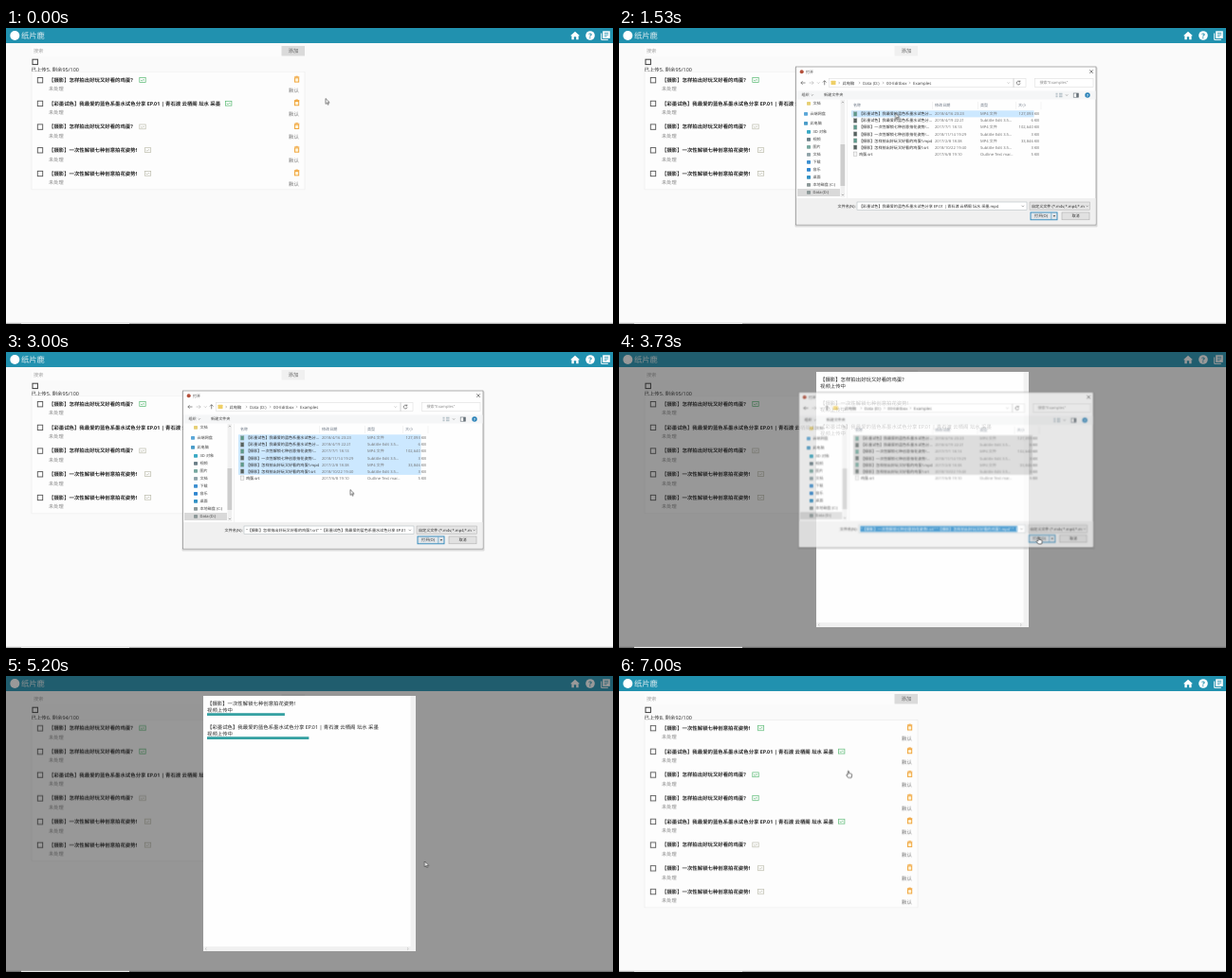
These frames come from a looping animation (640 px wide and 313 px high, 7.07 s). An HTML page:

```html
<!DOCTYPE html>
<html>
<head>
<meta charset="utf-8">
<title>Upload demo</title>
<style>
html, body { margin: 0; width: 100%; height: 100%; overflow: hidden; background: #fafafa; }
svg { display: block; width: 100vw; height: 100vh; }
text { font-family: "Noto Sans", "Noto Sans CJK SC", sans-serif; white-space: pre; text-rendering: geometricPrecision; }

.anim { animation: 7070ms linear infinite; }
.step { animation-timing-function: step-end; }

.rows { animation-name: rows; }
@keyframes rows {
  0% { transform: translateY(-74.1px); }
  69% { transform: translateY(-49.4px); }
  84.2% { transform: translateY(-24.7px); }
  90.5%, 100% { transform: translateY(0); }
}
.n5 { animation-name: n5; }
.n6 { animation-name: n6; }
.n7 { animation-name: n7; }
.n8 { animation-name: n8; }
@keyframes n5 { 0% { opacity: 1; } 69%, 100% { opacity: 0; } }
@keyframes n6 { 0% { opacity: 0; } 69% { opacity: 1; } 84.2%, 100% { opacity: 0; } }
@keyframes n7 { 0% { opacity: 0; } 84.2% { opacity: 1; } 90.5%, 100% { opacity: 0; } }
@keyframes n8 { 0% { opacity: 0; } 90.5%, 100% { opacity: 1; } }

.add { animation-name: add; }
@keyframes add { 0% { fill: #dadada; } 12.3% { fill: #f0f0f0; } 90.5%, 100% { fill: #dadada; } }

.modal { animation-name: modal; }
@keyframes modal { 0% { opacity: 0; } 52.3% { opacity: 1; } 90.5%, 100% { opacity: 0; } }
.queue { animation-name: queue; }
@keyframes queue { 0% { transform: none; } 69%, 100% { transform: translateY(-25px); } }
.up1 { animation-name: n5; }
.up3 { animation-name: up3; }
@keyframes up3 { 0% { opacity: 1; } 84.2%, 100% { opacity: 0; } }

.bar { transform-box: fill-box; transform-origin: left; }
.bar1 { animation-name: bar1; }
.bar2 { animation-name: bar2; }
.bar3 { animation-name: bar3; }
@keyframes bar1 { 0%, 54% { transform: scaleX(0); } 67.9%, 100% { transform: scaleX(1); } }
@keyframes bar2 { 0%, 63.2% { transform: scaleX(0); } 89.1%, 100% { transform: scaleX(1); } }
@keyframes bar3 { 0%, 64.2% { transform: scaleX(0); } 82%, 100% { transform: scaleX(1); } }

.dialog { animation-name: dialog; transform-origin: 344.5px 125px; }
@keyframes dialog {
  0%, 12.3% { opacity: 0; transform: scale(.95); }
  14%, 52.3% { opacity: 1; transform: none; }
  54.5%, 100% { opacity: 0; transform: scale(.91); }
}
.band { animation-name: band; transform-box: fill-box; transform-origin: top; }
@keyframes band {
  0% { transform: scaleY(0); fill: #cce8ff; }
  19.8% { transform: scaleY(.1667); }
  25% { transform: scaleY(.3333); }
  28% { transform: scaleY(.5); }
  31.5% { transform: scaleY(.6667); }
  35% { transform: scaleY(.8333); }
  38.5% { transform: scaleY(1); fill: #cce8ff; }
  52.2%, 100% { transform: scaleY(1); fill: #d4d4d4; }
}
.one { animation-name: one; }
.many { animation-name: many; }
.marked { animation-name: marked; }
@keyframes one { 0% { opacity: 0; } 19.8% { opacity: 1; } 25%, 100% { opacity: 0; } }
@keyframes many { 0% { opacity: 0; } 25% { opacity: 1; } 52.2%, 100% { opacity: 0; } }
@keyframes marked { 0% { opacity: 0; } 52.2%, 100% { opacity: 1; } }

.cursor { animation-name: cursor; animation-timing-function: ease-in-out; }
@keyframes cursor {
  0%, 1% { transform: translate(337px, 74.5px); }
  9%, 13% { transform: translate(303px, 22px); }
  19%, 22.5% { transform: translate(291.5px, 90px); }
  25% { transform: translate(292px, 97px); }
  28% { transform: translate(293px, 104px); }
  31.5% { transform: translate(294px, 111px); }
  35% { transform: translate(295px, 118px); }
  38.5% { transform: translate(297px, 125px); }
  41.7%, 43% { transform: translate(363px, 145.5px); }
  50.5%, 90% { transform: translate(441.5px, 196px); animation-timing-function: linear; }
  93.9% { transform: translate(339px, 150px); animation-timing-function: ease-out; }
  98.5%, 100% { transform: translate(241px, 100.5px); }
}
.arrow { animation-name: arrow; }
.hand { animation-name: hand; }
@keyframes arrow {
  0% { opacity: 1; } 8% { opacity: 0; } 13% { opacity: 1; }
  52.3% { opacity: 0; } 55% { opacity: 1; } 96%, 100% { opacity: 0; }
}
@keyframes hand {
  0% { opacity: 0; } 8% { opacity: 1; } 13% { opacity: 0; }
  52.3% { opacity: 1; } 55% { opacity: 0; } 96%, 100% { opacity: 1; }
}
</style>
</head>
<body>
<svg id="stage" viewBox="0 0 640 313"></svg>
<script>
const EGG = '【摄影】怎样拍出好玩又好看的鸡蛋?';
const FLOWER = '【摄影】一次性解锁七种创意拍花姿势!';
const INK = '【彩墨试色】我最爱的蓝色系墨水试色分享 EP.01 | 青石渡 云栖阁 坛水 采墨';
const ROW = 24.7, UPLOAD = 25;

// y is the vertical middle of the line
const text = (x, y, s, size = 4.1, fill = '#444', extra = '') =>
  `<text x="${x}" y="${(y + size * .36).toFixed(2)}" font-size="${size}" fill="${fill}" ${extra}>${s}</text>`;
const rect = (x, y, w, h, fill, extra = '') =>
  `<rect x="${x}" y="${y}" width="${w}" height="${h}" fill="${fill}" ${extra}/>`;
const path = (d, stroke, width = .6, fill = 'none') =>
  `<path d="${d}" stroke="${stroke}" stroke-width="${width}" fill="${fill}"/>`;
const group = (cls, body, extra = '') => `<g class="${cls}" ${extra}>${body}</g>`;
const clip = (id, x, y, w, h) => `<clipPath id="${id}">${rect(x, y, w, h, '#000')}</clipPath>`;
const box = (x, y) => rect(x, y, 5.4, 5.4, 'none', 'stroke="#555" stroke-width=".9"');

function header() {
  return rect(0, 0, 640, 16, '#2191af')
    + '<circle cx="9.3" cy="8" r="5" fill="#fff"/>'
    + text(16, 8, '纸片鹿', 8.3, '#e4eff2')
    + path('M595 8.3L600 3.7 605 8.3H603.6V12.3H601.2V9.3H598.8V12.3H596.4V8.3Z', 'none', 0, '#fff')
    + '<circle cx="616" cy="8" r="4.8" fill="#fff"/>'
    + text(616, 8.1, '?', 7.5, '#2191af', 'text-anchor="middle" font-weight="700"')
    + path('M627.7 5.5V12.4H634.8', '#fff', 1)
    + rect(629.2, 3.3, 7.6, 7.6, '#fff')
    + path('M630.8 5.3H635.2M630.8 7.1H635.2M630.8 8.9H633.5', '#2191af', .8);
}

function toolbar() {
  const count = n => group(`anim step n${n}`, text(26.5, 44, `已上传${n}, 剩余${100 - n}/100`, 5.4, '#333'));
  return rect(27, 18.5, 288, 11.5, '#fcfcfc')
    + text(29, 24.5, '搜索', 5.2, '#a4a4a4')
    + rect(290.5, 19, 24.5, 10.5, '#dadada', 'class="anim step add"')
    + text(303, 24.4, '添加', 5.4, '#666', 'text-anchor="middle"')
    + rect(28, 33.2, 5.4, 5.4, 'none', 'stroke="#3c3c3c" stroke-width="1"')
    + [5, 6, 7, 8].map(count).join('');
}

function listRow(title, i) {
  const y = 55 + i * ROW;
  const mark = title === INK ? 231.5 : title === EGG ? 140.8 : 146.3;
  const tone = i < 5 ? '#55b870' : '#bcbcac';
  return box(33.3, y - 2.5)
    + text(45, y, title, 5.4, '#222', 'font-weight="700"')
    + text(45, y + 9.6, '未处理', 5.2, '#858585')
    + rect(mark, y - 2.4, 6.4, 4.8, 'none', `stroke="${tone}" stroke-width=".7"`)
    + path(`M${mark + 1.2} ${y}l1.4 1 1.2 -1.4 1.3 .5`, tone, .7)
    + path(`M303.9 ${y - 3.2}h5.4M305.4 ${y - 3.8}h2.4`, '#f0a030', .8)
    + rect(304.5, y - 2.2, 4.2, 4.3, '#fff3d8', 'stroke="#f0a030" stroke-width=".9"')
    + text(298, y + 11, '默认', 5.4, '#707070');
}

function list() {
  const titles = [FLOWER, INK, EGG, EGG, INK, EGG, FLOWER, FLOWER];
  const panel = rect(27, 46.3, 288, 198.6, '#fdfdfd', 'stroke="#ececec" stroke-width=".6"');
  return group('', group('anim step rows', panel + titles.map(listRow).join('')), 'clip-path="url(#listClip)"')
    + path('M27 46.3H315', '#ececec');
}

function upload(title, i) {
  const y = 29 + i * UPLOAD;
  return group(`anim step up${i + 1}`,
    text(212, y, title, 5.4, '#222')
    + text(212, y + 7.2, '视频上传中', 5.4, '#333')
    + rect(212, y + 10.2, 204.3, 2.8, '#36a1a2', `class="anim bar bar${i + 1}"`));
}

function modal() {
  return group('anim step modal',
    rect(0, 0, 640, 313, 'rgba(33,33,33,.46)')
    + rect(208, 21, 224, 270, '#fefefe')
    + rect(426.5, 21, 5.5, 270, '#f1f1f1') + rect(208, 286, 224, 5, '#f1f1f1')
    + path('M211.5 287.3l-1.3 1.2 1.3 1.2M423 287.3l1.3 1.2 -1.3 1.2', '#a3a3a3', .5)
    + group('', group('anim step queue', [EGG, FLOWER, INK].map(upload).join('')), 'clip-path="url(#modalClip)"'));
}

function sidebar() {
  const items = [
    ['文档', 80, '#e6cf74'], ['云端网盘', 91, '#5ba7d8'], ['此电脑', 101, '#4a9cc8'], ['3D 对象', 110, '#3aa9c4'],
    ['视频', 118, '#6b7f88'], ['图片', 126, '#78a8a0'], ['文档', 134, '#8fa3a8'], ['下载', 142, '#3c8fd0'],
    ['音乐', 150, '#2f86d0'], ['桌面', 158, '#3291c4'], ['本地磁盘 (C:)', 166, '#8c9898'], ['Data (D:)', 174, '#8c9898']];
  return rect(188, 170, 45, 8, '#d9d9d9')
    + items.map(([name, y, tone], i) => {
      const x = i === 1 || i === 2 ? 195 : 198;
      return rect(x, y - 1.9, 4, 3.6, tone, 'rx=".6"') + text(x + 6.5, y, name);
    }).join('')
    + rect(233.5, 76, 4.7, 103, '#f0f0f0') + rect(233.5, 123, 4.7, 44, '#cdcdcd')
    + path('M234.7 79.2l1.2 -1.2 1.2 1.2M234.7 175.8l1.2 1.2 1.2 -1.2', '#6a6a6a', .5);
}

function files() {
  const srt = 'Subtitle Edit 3.5…', mp4 = 'MP4 文件';
  const ink = '【彩墨试色】我最爱的蓝色系墨水试色分…';
  const rows = [
    [ink, '2018/4/16 23:23', mp4, '127,093 KB'],
    [ink, '2018/4/19 22:21', srt, '6 KB'],
    [FLOWER + '…', '2017/7/1 18:13', mp4, '102,640 KB'],
    [FLOWER + '…', '2018/11/14 19:29', srt, '3 KB'],
    [EGG + '.mp4', '2017/2/8 18:38', mp4, '33,846 KB'],
    [EGG + '.srt', '2018/10/22 19:40', srt, '3 KB'],
    ['鸡蛋.srt', '2017/6/8 19:10', 'Outline Text mar…', '5 KB']];
  const heads = [['名称', 247], ['修改日期', 333], ['类型', 381], ['大小', 421]];
  return heads.map(([s, x]) => text(x, 81.8, s, 4.1, '#6c7684')).join('')
    + path('M330.5 78V86M378.5 78V86M418.5 78V86M445 78V86', '#e2e2e2', .4)
    + rect(245, 87.3, 192.5, 42.6, '#cce8ff', 'class="anim step band"')
    + rows.map(([name, date, type, size], i) => {
      const y = 90.9 + i * 7.05;
      return rect(247.3, y - 2.2, 3.6, 4.4, i < 6 ? (i % 2 ? '#55615f' : '#5d9a8c') : '#f4f4f4', 'stroke="#a5a5a5" stroke-width=".4"')
        + text(253, y, name, 4.1, '#2c2c2c') + text(333, y, date, 4.1, '#757575')
        + text(381, y, type, 4.1, '#757575') + text(443, y, size, 4.1, '#757575', 'text-anchor="end"');
    }).join('');
}

function nameField() {
  const all = `"${EGG}.srt" "${INK}.mp4"`;
  const pair = `"${FLOWER}.srt" "${EGG}.mp4" "${INK}.mp4"`;
  const line = (cls, s, fill) => group(`anim step ${cls}`, text(253, 188.4, s, 4.1, fill));
  return rect(251, 184, 179, 8.6, '#fff', 'stroke="#a9b3b8" stroke-width=".5"')
    + group('',
      line('one', INK + '.mp4', '#2c2c2c') + line('many', all, '#2c2c2c')
      + group('anim step marked', rect(252.5, 185.2, 169, 6.3, '#1f83c4')) + line('marked', pair, '#fff'),
      'clip-path="url(#nameClip)"')
    + path('M424.5 187.7l1.3 1.3 1.3 -1.3', '#5c5c5c', .5);
}

function dialog() {
  const line = '#dadada';
  return group('anim dialog',
    rect(185.5, 41.5, 319, 169, '#666', 'opacity=".22" rx="1"')
    + rect(186.5, 41, 316.5, 167, '#fefefe', 'stroke="#8c8c8c" stroke-width=".7"')
    + '<circle cx="192.7" cy="46.2" r="2" fill="#b5513c"/>'
    + text(197, 46.2, '打开')
    + path('M496.3 44.3l3.6 3.6M499.9 44.3l-3.6 3.6', '#333', .6)
    + path('M196.5 58H191.8l1.8 -1.8M191.8 58l1.8 1.8', '#444')
    + path('M200.5 58h4.7l-1.8 -1.8M205.2 58l-1.8 1.8M209 57.4l1.3 1.3 1.3 -1.3', '#b0b0b0')
    + path('M216.7 60.3V55.7l-1.8 1.8M216.7 55.7l1.8 1.8', '#444')
    + rect(221.5, 53.5, 207.5, 9, '#fff', `stroke="${line}" stroke-width=".5"`)
    + rect(223.5, 55.8, 5, 4.3, '#efcf66', 'rx=".4"')
    + [['此电脑', 235.5], ['Data (D:)', 257], ['00-Editbox', 282], ['Examples', 310]].map(([s, x]) =>
      text(x, 58, s, 4.3) + path(`M${x - 4} 56.8l1.2 1.2 -1.2 1.2`, '#808080', .5)).join('')
    + path('M409.5 57.4l1.2 1.2 1.2 -1.2M416 53.5V62.5', '#a3a3a3', .5)
    + path('M422.5 56.7A1.9 1.9 0 1 0 423 58.4M422.8 55.5V57H421.3', '#444', .6)
    + rect(438.5, 53.5, 61.5, 9, '#fff', `stroke="${line}" stroke-width=".5"`)
    + text(443.5, 58, '搜索"Examples"', 4.1, '#8c8c8c')
    + rect(187, 66.5, 315.5, 9, '#f5f6f7')
    + text(192.5, 71, '组织') + path('M202.7 70.3l1.1 1.1 1.1 -1.1', '#5c5c5c', .5)
    + text(216, 71, '新建文件夹')
    + path('M460.5 69.3h2M460.5 71h2M460.5 72.7h2M464 69.3h3.5M464 71h3.5M464 72.7h3.5', '#7a8f9c')
    + path('M471 70.4l1.1 1.1 1.1 -1.1', '#5c5c5c', .5)
    + rect(479.2, 69, 5.2, 4.2, '#fff', 'stroke="#667078" stroke-width=".6"') + rect(482.2, 69, 2.2, 4.2, '#667078')
    + '<circle cx="494" cy="71" r="2.7" fill="#2a82b8"/>'
    + text(494, 71.1, '?', 4.2, '#fff', 'text-anchor="middle" font-weight="700"')
    + sidebar() + path('M240.5 76V180', '#e6e6e6', .5) + files()
    + rect(187, 180, 315.5, 27.5, '#f0f0f0')
    + text(249.5, 188.4, '文件名(N):', 4.1, '#2c2c2c', 'text-anchor="end"')
    + nameField()
    + rect(433, 184, 63.5, 8.6, '#e4e4e4', 'stroke="#adadad" stroke-width=".5"')
    + text(435, 188.4, '自定义文件 (*.m4v;*.mp4;*.m', 4.1, '#2c2c2c')
    + path('M492.5 187.7l1.2 1.2 1.2 -1.2', '#5c5c5c', .5)
    + rect(434, 195, 28, 7.8, '#e1e6ea', 'stroke="#2a84b8" stroke-width=".9"')
    + text(445, 198.9, '打开(O)', 4.1, '#2c2c2c', 'text-anchor="middle"')
    + path('M455.8 195.5V202.5', '#2a84b8', .5) + path('M457.6 198.2h2.6l-1.3 1.6Z', 'none', 0, '#333')
    + rect(467, 195, 29, 7.8, '#e1e1e1', 'stroke="#adadad" stroke-width=".6"')
    + text(481.5, 198.9, '取消', 4.1, '#2c2c2c', 'text-anchor="middle"'));
}

function cursor() {
  const arrow = path('M0 0V5.8L1.4 4.6 2.3 6.6 3.2 6.2 2.3 4.3H4.1Z', '#222', .55, '#fff');
  const hand = path('M.2 .3Q.9 -.5 1.5 .3V2.4L4 3Q4.9 3.3 4.7 4.2L4.1 7H.6L-1.4 4.3Q-1.3 3.2 .2 4.1Z', '#222', .6, '#fff');
  return group('anim cursor', group('anim step arrow', arrow) + group('anim step hand', hand));
}

document.getElementById('stage').innerHTML =
  `<defs>${clip('listClip', 26, 46, 290, 267)}${clip('modalClip', 208, 22, 218, 264)}${clip('nameClip', 251.5, 184, 171, 8.6)}</defs>`
  + rect(0, 0, 640, 313, '#fafafa')
  + header() + toolbar() + list()
  + rect(0, 311.8, 640, 1.2, '#b0b0b0')
  + modal() + rect(16, 311.8, 114, 1.2, '#e6e6e6') + dialog() + cursor();
</script>
</body>
</html>
```
